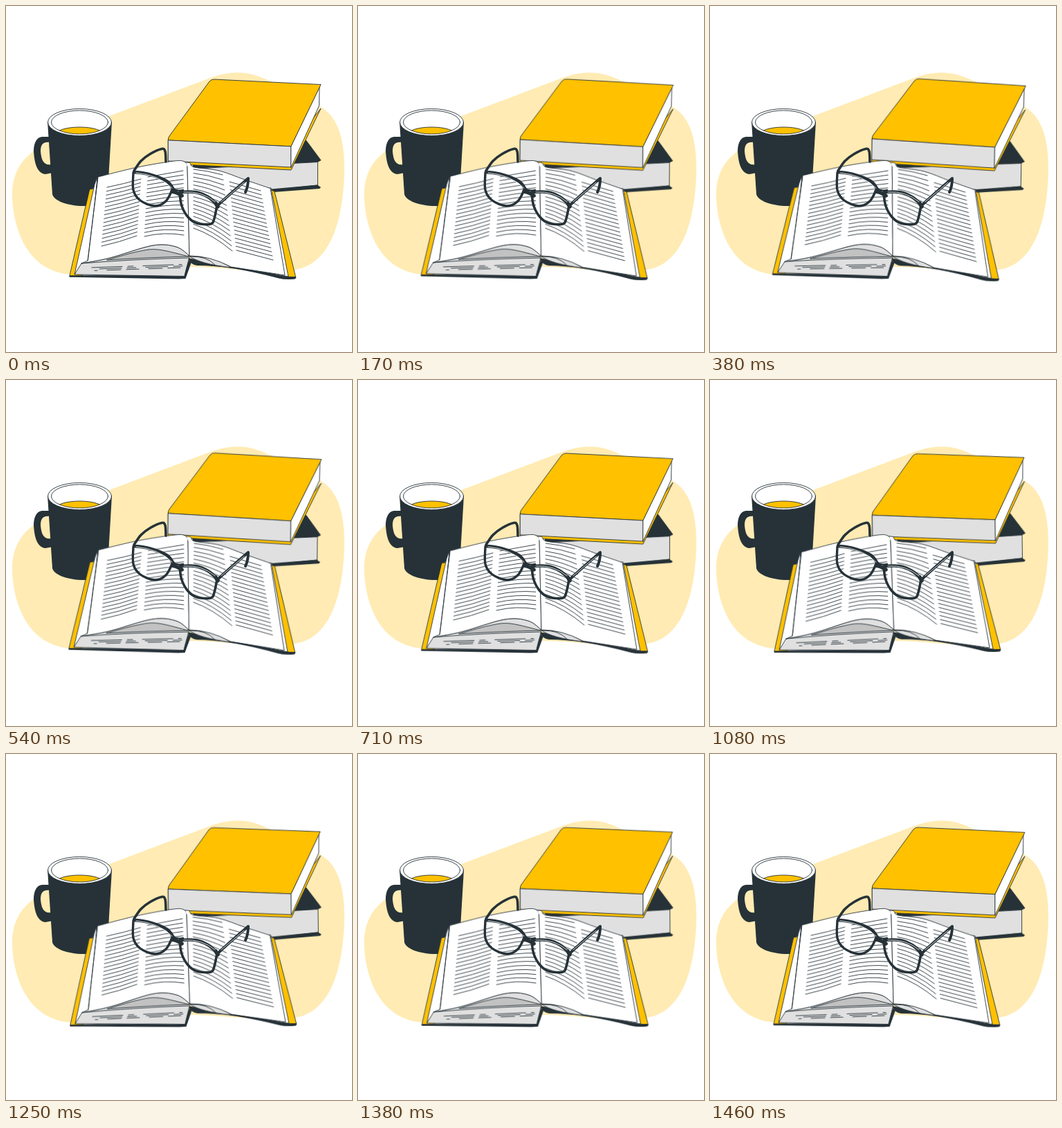
Recreate the animation shown at these times as an HTML page. Size 500 by 500 pixels, loop 1.5 s.

```html
<!DOCTYPE html>
<html lang="en">
<head>
<meta charset="utf-8">
<title>Books, coffee and glasses</title>
<style>
  html, body { margin: 0; width: 100%; height: 100%; overflow: hidden; background: #fff; }
  svg { display: block; width: 100%; height: 100%; }
  .ink { fill: #263238; }
  .gold { fill: #ffc100; }
  .grey { fill: #e0e0e0; }
  .shade { fill: #c2c2c2; }
  .white { fill: #fff; }
  .none { fill: none; }
  .edge { stroke: #263238; stroke-width: .9; stroke-linejoin: round; stroke-linecap: round; }
  #stack { transform-origin: 344.5px 187px; }
  #book { transform-origin: 255px 309px; }
  #glasses { fill: none; stroke: #263238; stroke-linejoin: round; stroke-linecap: round; }
</style>
</head>
<body>
<svg viewBox="0 0 500 500">
  <path fill="#ffebb3" d="M36 213C18 227 9 248 9 272C9 315 28 388 100 388C160 388 210 377 265 377S370 388 418 381C468 373 488 312 489 235C489 195 481 161 455 146Q420 121 380 108C350 93 325 93 295 104L152 158C110 175 60 190 36 213Z"/>
  <g id="cup">
    <path class="ink" fill-rule="evenodd" d="M64 189H52C43 190 40 200 40 210C41 227 45 242 57 243L68 241ZM63 197C53 196 50 201 50 210C51 222 54 231 66 229Z"/>
    <path class="ink" d="M60 167L67 272C69 281 88 289 112 289S146 279 147 268L153 167Z"/>
    <ellipse class="white edge" cx="106.5" cy="168" rx="46" ry="19.5"/>
    <clipPath id="mouth"><ellipse cx="106.5" cy="168" rx="41" ry="17"/></clipPath>
    <ellipse class="gold edge" cx="106.5" cy="186" rx="35" ry="11" clip-path="url(#mouth)"/>
    <ellipse class="none edge" cx="106.5" cy="168" rx="41" ry="17"/>
  </g>
  <g id="stack"></g>
  <g id="book"></g>
  <g id="glasses"></g>
</svg>
<script>
  const byId = id => document.getElementById(id);

  function draw(id, d, attrs) {
    const path = document.createElementNS('http://www.w3.org/2000/svg', 'path');
    for (const [k, v] of Object.entries({ d, ...attrs })) path.setAttribute(k, v);
    byId(id).append(path);
  }
  const fill = (id, look, d) => draw(id, d, { class: look });
  const wire = (width, d, stroke = '#263238') => draw('glasses', d, { 'stroke-width': width, stroke });

  const poly = pts => `M${pts.join('L')}Z`;

  // Smooth curve through key points written as "x,y x,y".
  function smooth(text, start = 'M') {
    const p = text.split(' ').map(s => s.split(',').map(Number));
    const at = i => p[Math.max(0, Math.min(p.length - 1, i))];
    const lean = (a, b, c, sign) => a.map((v, k) => v + sign * (c[k] - b[k]) / 6);
    return start + p[0] + p.slice(1).map((q, i) =>
      `C${lean(p[i], at(i - 1), q, 1)} ${lean(q, p[i], at(i + 2), -1)} ${q}`).join('');
  }

  // Closed books: a cover, pages dropped straight below it, a back cover.
  const drop = (pts, by) => pts.map(([x, y]) => [x, y + by]);
  const left = [234.5, 193.5], back = [455, 113.5], front = [412, 202.5];
  const pages = 30.5;
  fill('stack', 'ink', 'M270 228L434 194L455.500 223L450 226L270 235Z');
  fill('stack', 'grey edge', 'M274 235L450.500 225.500V259L384 266L274 252Z');
  fill('stack', 'ink', 'M378 265L450 258.500L455 262L453 264L386 269Z');
  fill('stack', 'gold edge', poly([left, ...drop([left, front, back], pages + 4), front]));
  fill('stack', 'grey edge', poly([left, front, ...drop([front, left], pages)]));
  fill('stack', 'white edge', poly([front, [453, 117], ...drop([[452.5, 113.5], front], pages)]));
  fill('stack', 'gold edge', `M${left}Q234 191 236 188L294 109Q297 105.700 301 106L${back}L${front}Z`);

  // Open book.
  const lip = '265,361 246,348 212,346 150,364 109,372';
  fill('book', 'gold edge', 'M121 265L134 262L110 390L92 391Z');
  fill('book', 'gold edge', 'M380 264L388 268L419 393H405Z');
  fill('book', 'ink', 'M92 389.300L256 389L264 368L268 370L259.500 394L250 394.500L92 391.800Z');
  fill('book', 'ink', 'M262 364L410 391H419L418 394.500Q404 396 394 393.500Q325 375 276 375Q267 374 262 364Z');
  fill('book', 'white edge', 'M132 247L128 258L99 388L120 372Z');
  fill('book', 'grey edge', smooth(lip) + 'L99 388L257.500 390.500Z');
  fill('book', 'shade edge', smooth('146,367 190,355 220,352 264,362') + 'Q215 363 146 367');
  fill('book', 'none edge', 'M109 372Q180 366 264 364');
  fill('book', 'white edge', smooth('133,247 190,233 243,224 258,225 262,231') + smooth(lip, 'L') + 'L118 368Z');
  fill('book', 'none edge', 'M133 247L118 368');
  fill('book', 'white edge', 'M378 263H383L408 391L390 388Z');
  fill('book', 'grey edge', 'M264 361L300 364L326 378Q280 373 264 361Z');
  fill('book', 'white edge', smooth('260,226 266,227 272,233 308,238 345,251 382,263.5') +
    'L403 389L325 377Q295 361 265 361L262 232');
  fill('book', 'none edge', 'M266 362Q290 361 302 374');
  for (let row = 0; row < 3; row++) {
    draw('book', `M${124 + row * 2} ${378 + row * 2.2}l130 -4.500`,
      { class: 'none edge', 'stroke-dasharray': `${44 - row * 12} 8 ${8 + row * 5} 14`, 'stroke-dashoffset': -row * 9 });
  }

  // Each value pair runs from the top line of a column to its bottom line.
  function column(count, x, y, width, rise, arch) {
    let d = '';
    for (let i = 0; i < count; i++) {
      const mix = ([a, b]) => a + (b - a) * i / (count - 1);
      const w = mix(width), r = mix(rise);
      d += `M${mix(x)} ${mix(y)}q${w / 2} ${r / 2 - mix(arch)} ${w} ${r}`;
    }
    fill('book', 'none edge', d);
  }
  column(16, [146, 138], [262, 347], [49, 51], [-12, -15], [-1, -2]);
  column(16, [205, 200], [247, 333], [51, 57], [-9, -2], [0, 6]);
  column(16, [271, 271], [236, 321], [42, 56], [8, 33], [2, 7]);
  column(18, [323, 333], [254, 353], [45, 53], [13, 14], [0, 0]);

  // Glasses.
  wire(3.6, smooth('185,238 195,224 208,214 225,206.5 230,210 231,225'));
  wire(3.4, smooth('184,241 184,266 194,281 215,289 231,282 241,264'));
  wire(4.6, smooth('185,240 206,243 232,253 242,265'));
  wire(3.6, smooth('251,271 254,289 263,305 276,314 296,315 301,307 305,288'));
  wire(4.6, smooth('252,269 274,269 292,276 305,287'));
  wire(5.5, 'M240 268Q247 269 254 274M303 285L306 290');
  wire(2.5, 'M241 264Q248 268 256 266');
  wire(4, 'M305 289Q322 273 350 249Q350 261 346 269');
  wire(.8, 'M188 241Q221 244 240 263M257 269Q283 267 302 283M311 283L344 255', '#fff');

  // Gentle rocking at 24 steps per second.
  const rock = [
    { offset: 0, transform: 'rotate(0deg)', easing: 'steps(9)' },
    { offset: .25, transform: 'rotate(1deg)', easing: 'steps(18)' },
    { offset: .75, transform: 'rotate(-1deg)', easing: 'steps(9)' },
    { offset: 1, transform: 'rotate(0deg)' }
  ];
  for (const id of ['stack', 'book']) byId(id).animate(rock, { duration: 1500, iterations: Infinity });
</script>
</body>
</html>
```
